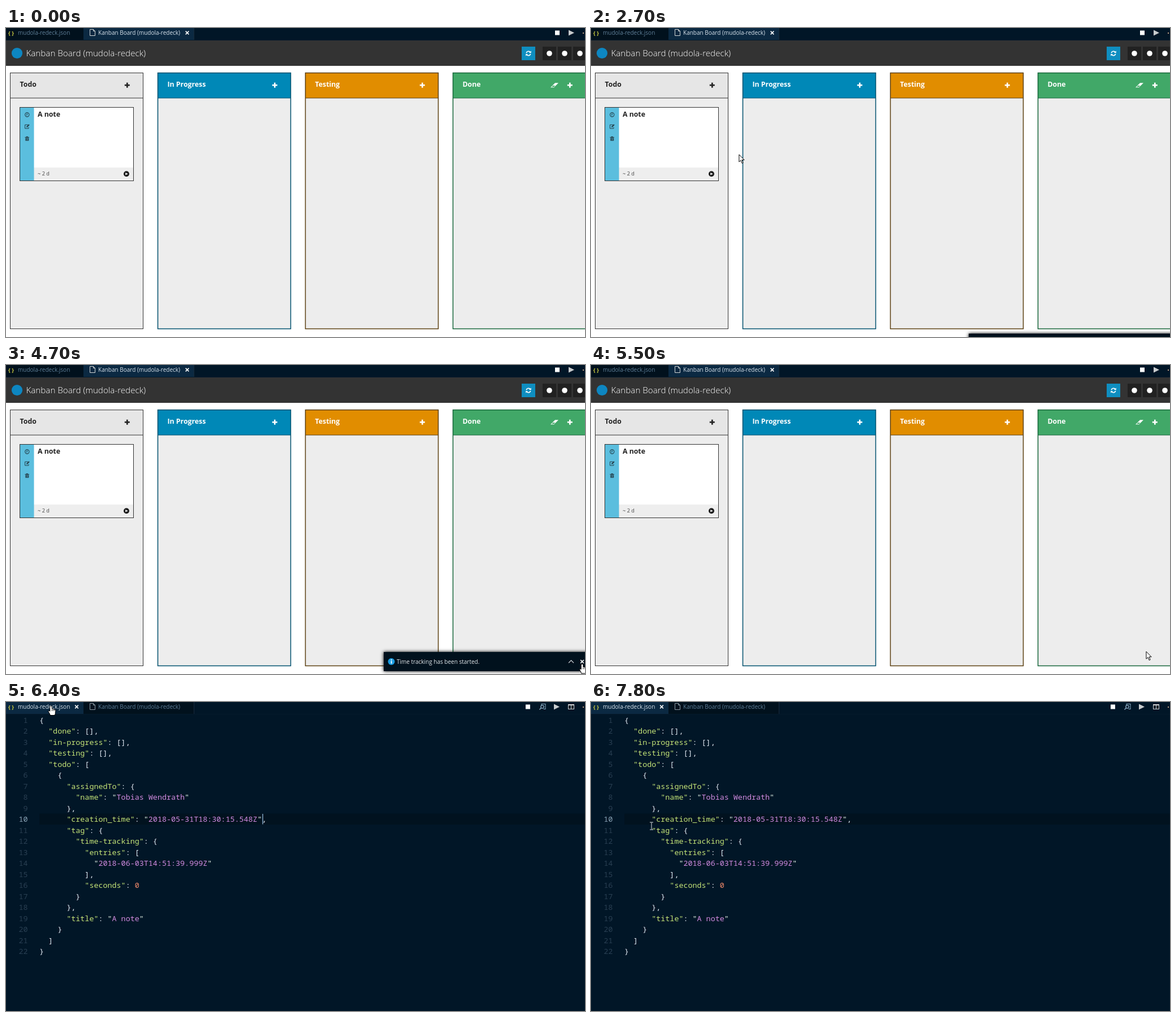
Recreate the animation shown at these times as an HTML page with a canvas. Size 1024 by 547 pixels, loop 8000 ms.

```html
<!DOCTYPE html>
<html lang="en">
<head>
<meta charset="utf-8">
<title>Board</title>
<style>
html, body { margin: 0; width: 100%; height: 100%; overflow: hidden; background: #fff; }
canvas { display: block; width: 100vw; height: 100vh; }
</style>
</head>
<body>
<canvas id="stage" width="1024" height="547"></canvas>
<script>
const ctx = document.getElementById('stage').getContext('2d');
const W = 1024, H = 547, LOOP = 8000, STEP = 100;
const EDITOR_AT = 6400;
const SANS = '"Open Sans", "Noto Sans", sans-serif';
const MONO = '"Noto Sans Mono", "DejaVu Sans Mono", monospace';
const PROJECT = 'mudola-redeck';
const TITLE = `Kanban Board (${PROJECT})`;

const BOARD = {
  done: [], 'in-progress': [], testing: [],
  todo: [{
    assignedTo: { name: 'Tobias Wendrath' },
    creation_time: '2018-05-31T18:30:15.548Z',
    tag: { 'time-tracking': { entries: ['2018-06-03T14:51:39.999Z'], seconds: 0 } },
    title: 'A note'
  }]
};
const LINES = JSON.stringify(BOARD, null, 2).split('\n');

const COLUMNS = [
  { name: 'Todo', fill: '#e6e6e6', edge: '#333', ink: '#222' },
  { name: 'In Progress', fill: '#0088b7', edge: '#00506e', ink: '#fff' },
  { name: 'Testing', fill: '#e18d00', edge: '#5c4012', ink: '#fff' },
  { name: 'Done', fill: '#41a868', edge: '#17663a', ink: '#fff' }
];

const ENTRY = { x: 903, y: 296 };
const MOVES = [
  { from: 300, to: 1100, x: 36.5, y: 152.5 },
  { from: 2400, to: 3280, x: 873, y: 418 },
  { from: 3500, to: 4400, x: 1019, y: 529.5 },
  { from: 5200, to: 5300, x: 1014, y: 525 },
  { from: 5400, to: 6300, x: 79.5, y: 7 },
  { from: 7100, to: 7500, x: 100, y: 235 },
  { from: 7500, to: 7800, x: 107, y: 219.5 }
];

const ramp = (t, a, b) => Math.max(0, Math.min(1, (t - a) / (b - a)));
const ease = (t, a, b) => { const p = ramp(t, a, b); return p * p * (3 - 2 * p); };

function rect(x, y, w, h, color) {
  ctx.fillStyle = color;
  ctx.fillRect(x, y, w, h);
}

function frame(x, y, w, h, color, width = 1) {
  ctx.strokeStyle = color;
  ctx.lineWidth = width;
  ctx.strokeRect(x, y, w, h);
}

function text(str, x, y, size, color, weight = 400, family = SANS) {
  ctx.font = `${weight} ${size}px ${family}`;
  ctx.fillStyle = color;
  ctx.fillText(str, x, y);
}

function disc(x, y, r, color) {
  ctx.fillStyle = color;
  ctx.beginPath();
  ctx.arc(x, y, r, 0, 7);
  ctx.fill();
}

function ring(x, y, r, color, width = 1) {
  ctx.strokeStyle = color;
  ctx.lineWidth = width;
  ctx.beginPath();
  ctx.arc(x, y, r, 0, 7);
  ctx.stroke();
}

function trace(pts, closed) {
  ctx.beginPath();
  pts.forEach(([x, y]) => ctx.lineTo(x, y));
  if (closed) ctx.closePath();
}

function poly(pts, color) {
  trace(pts, true);
  ctx.fillStyle = color;
  ctx.fill();
}

function line(pts, color, width = 1, closed = false) {
  trace(pts, closed);
  ctx.strokeStyle = color;
  ctx.lineWidth = width;
  ctx.stroke();
}

function at(x, y, draw, turn = 0) {
  ctx.save();
  ctx.translate(x, y);
  ctx.rotate(turn);
  draw();
  ctx.restore();
}

function plus(x, y, color, r = 4.5, width = 2.6) {
  rect(x - r, y - width / 2, r * 2, width, color);
  rect(x - width / 2, y - r, width, r * 2, color);
}

const cross = (x, y) => at(x, y, () => plus(0, 0, '#fff', 4, 1.6), Math.PI / 4);

function playIcon(x, y, r, color) {
  poly([[x - r, y - r], [x + r, y], [x - r, y + r]], color);
}

function fileIcon(x, y, color) {
  line([[x, y], [x + 6, y], [x + 9, y + 3], [x + 9, y + 11], [x, y + 11]], color, 1, true);
  line([[x + 6, y], [x + 6, y + 3], [x + 9, y + 3]], color);
}

function previewIcon(x, y) {
  const color = '#8fb0c8';
  frame(x - 1.5, y - 5, 7, 9, color);
  rect(x - 5, y - 2, 7, 7, '#011627');
  ring(x, y, 2.7, color, 1.2);
  line([[x - 2, y + 2], [x - 5, y + 5]], color, 1.5);
}

function splitIcon(x, y, color) {
  frame(x - 5, y - 4, 10, 8, color);
  rect(x - 5, y - 4, 10, 1.5, color);
  rect(x - 0.5, y - 4, 1, 8, color);
}

function tabs(editing, hover) {
  const active = '#0b2942', idle = '#01111d', bright = '#d8e3ec', dim = '#5f7e97';
  const [json, board] = editing ? [active, idle] : [idle, active];
  rect(0, 0, W, 22, '#011627');
  rect(0, 0, 137, 21, json);
  rect(137, 0, 196, 21, board);
  rect(332, 0, 1, 21, '#182a3b');
  rect(0, 21, W, 1, '#061a2b');

  text('{ }', 4, 11.5, 9.5, '#cbcb41', 700);
  text(PROJECT + '.json', 21, 12, 10, editing ? bright : dim);
  fileIcon(148.5, 2.5, editing ? '#8f9aa3' : '#d4d7d6');
  text(TITLE, 163, 12, 10, editing ? dim : bright);
  if (editing || hover) cross(125, 8.5);
  if (!editing) cross(320.5, 8.5);

  const play = editing ? 974 : 1000;
  rect(play - (editing ? 55 : 29), 4.5, 8, 8, '#fff');
  playIcon(play, 8.5, 5, '#c9ccce');
  rect(1020, 8, 2, 2, '#c5a98a');
  if (editing) {
    previewIcon(948.5, 8.5);
    splitIcon(999.5, 8.5, '#d5d5d5');
  }
}

function refreshArc() {
  ctx.strokeStyle = '#fff';
  ctx.lineWidth = 1.7;
  ctx.beginPath();
  ctx.arc(0, 0, 3.7, Math.PI * 1.05, Math.PI * 1.8);
  ctx.stroke();
  poly([[4.8, -4.6], [4.8, -0.9], [1.1, -0.9]], '#fff');
}

function header() {
  rect(0, 22, W, 45, '#333');
  disc(19.5, 44.5, 9.6, '#0d86c1');
  text(TITLE, 35.5, 49.5, 15.2, '#fff', 300);
  rect(912, 33, 24, 24, '#0f8ec0');
  at(924, 45, refreshArc);
  at(924, 45, refreshArc, Math.PI);
  for (let x = 949; x < W; x += 27) {
    rect(x, 33, 24, 24, '#212121');
    disc(x + 12, 45, 4.8, '#fff');
  }
}

function column({ name, fill, edge, ink }, i) {
  const x = 7 + i * 261;
  rect(x, 79, 236, 454, '#ededed');
  rect(x, 79, 236, 45, fill);
  frame(x + 0.5, 79.5, 235, 453, edge, i ? 1.5 : 1);
  rect(x, 123.5, 236, 1, edge);
  text(name, x + 17.5, 104, 12.3, ink, 700);
  plus(x + 207.3, 101.2, ink);
}

function eraser(x, y) {
  const slab = (left, right, top, bottom, color) =>
    poly([[left - top, y + top], [right - top, y + top], [right - bottom, y + bottom], [left - bottom, y + bottom]], color);
  slab(x - 2, x + 4, -4, 4, '#fff');
  slab(x - 1, x + 3, 0.8, 3, '#41a868');
}

function cardIcons(x, ink) {
  ring(x, 153.5, 3.6, ink, 1.1);
  line([[x, 151.3], [x, 154], [x - 1.7, 154]], ink);

  line([[x + 1.7, 171.3], [x - 3.7, 171.3], [x - 3.7, 177.9], [x + 2.7, 177.9], [x + 2.7, 175.5]], ink);
  line([[x - 0.8, 175.5], [x + 3.7, 171]], ink, 1.9);

  rect(x - 3.8, 193, 7.5, 1.1, ink);
  rect(x - 1.6, 191.9, 3, 1.2, ink);
  rect(x - 3, 194.6, 6, 5, ink);
  for (let i = -1; i <= 1; i++) rect(x + i * 1.4 - 0.25, 195.4, 0.5, 3.2, '#5bbede');
}

function card(hover) {
  rect(24, 140, 202, 131, '#fff');
  rect(49, 247, 176, 23, '#eee');
  rect(25, 141, 24.5, 129, '#5bbede');
  frame(24.5, 140.5, 201, 130, hover ? '#1a93bd' : '#333');
  text('A note', 56, 156.8, 12.3, '#222', 700);
  text('~ 2 d', 56, 261.3, 9.2, '#444');
  disc(213, 258.3, 5, '#1c1c1c');
  playIcon(213.5, 258.3, 2.3, '#eee');
  cardIcons(37.3, '#24404b');
}

function shadow(color, blur, offset = 0) {
  ctx.shadowColor = color;
  ctx.shadowBlur = blur;
  ctx.shadowOffsetX = ctx.shadowOffsetY = offset;
}

function tooltip(alpha) {
  ctx.save();
  ctx.globalAlpha = alpha;
  shadow('rgba(0,0,0,.55)', 3, 2.5);
  rect(35.5, 172.5, 57, 16, '#fff');
  shadow('transparent', 0);
  frame(36, 173, 56, 15, '#767676');
  text('Track Time', 40, 184, 9.25, '#575757');
  ctx.restore();
}

function toast(shown, alpha, hover) {
  ctx.save();
  ctx.globalAlpha = alpha;
  ctx.translate(0, (1 - shown) * 39);
  shadow('#000', 6);
  rect(668, 508, 370, 34, '#01111d');
  shadow('transparent', 0);
  disc(681.5, 525, 6, '#1b9de2');
  rect(680.7, 521, 1.8, 1.8, '#fff');
  rect(680.7, 523.8, 1.8, 4.8, '#fff');
  text('Time tracking has been started.', 691, 528.8, 10, '#e4e9ec');
  if (hover) {
    line([[995, 527.3], [999.5, 522.8], [1004, 527.3]], '#d5dade', 1.2);
    cross(1019, 525);
  }
  ctx.restore();
}

const inside = (p, x, y, w, h) => !!p && p.x > x && p.x < x + w && p.y > y && p.y < y + h;

function drawBoard(t, ptr) {
  rect(0, 0, W, H, '#fff');
  tabs(false, inside(ptr, 0, 0, 137, 21));
  header();
  COLUMNS.forEach(column);
  eraser(969, 101.2);
  card(inside(ptr, 24, 140, 202, 131));

  const shown = ease(t, 2600, 3000);
  const alpha = 1 - ramp(t, 5000, 5300);
  if (shown && alpha) toast(shown, alpha, inside(ptr, 668, 508, 356, 39));
}

function drawCode(str, x, y) {
  const put = (part, color) => {
    text(part, x, y, 13.4, color, 500, MONO);
    x += ctx.measureText(part).width;
  };
  const tokens = /("[^"]*")(?=:)|"([^"]*)"|(\d+)|[^"\d]+/g;
  for (const [all, key, value, number] of str.matchAll(tokens)) {
    if (key) put(key, '#c5e478');
    else if (value) {
      put('"', '#e6f5e8');
      put(value, '#d28be0');
      put('"', '#e6f5e8');
    } else put(all, number ? '#f78c6c' : '#e4ebf4');
  }
}

function drawEditor(t) {
  const current = LINES.findIndex(s => s.includes('creation_time'));
  rect(0, 0, W, H, '#011627');
  tabs(true);
  rect(59, 197.5, W - 59, 19.5, '#01121f');
  LINES.forEach((str, i) => {
    const y = 37 + i * 19.48;
    ctx.textAlign = 'right';
    text(i + 1, 38.5, y, 13.4, i === current ? '#8ba3b5' : '#293f52', 400, MONO);
    ctx.textAlign = 'left';
    drawCode(str, 59, y);
  });
  const caretOn = Math.floor((t - EDITOR_AT + 100) / 500) % 2 === 0;
  if (caretOn) rect(453.3, 198, 1.5, 18.5, '#80a4c2');
}

function pointerAt(t) {
  if (t < MOVES[0].from) return null;
  return MOVES.reduce((p, m) => {
    const k = ease(t, m.from, m.to);
    return { x: p.x + (m.x - p.x) * k, y: p.y + (m.y - p.y) * k };
  }, ENTRY);
}

function arrow() {
  const shape = [[0, 0], [0, 13], [3, 10.3], [5.2, 15.4], [7.2, 14.5], [5, 9.5], [9.2, 9.5]];
  poly(shape, '#fff');
  line(shape, '#000', 1, true);
}

function hand() {
  ctx.beginPath();
  for (let i = 0; i < 4; i++) {
    const top = i ? 4.6 + i * 0.6 : 0.3;
    ctx.roundRect(-1.3 + i * 2.1, top, 2.6, 12 - top, 1.2);
  }
  ctx.roundRect(-1.8, 8.5, 9, 7.6, 2);
  ctx.moveTo(-4.4, 9.5);
  ctx.lineTo(-2.8, 9);
  ctx.lineTo(0, 11);
  ctx.lineTo(-1.2, 14.5);
  ctx.closePath();
  ctx.strokeStyle = '#000';
  ctx.lineWidth = 1.8;
  ctx.stroke();
  ctx.fillStyle = '#fff';
  ctx.fill();
  for (let i = 1; i < 4; i++) rect(i * 2.1 - 0.8, 6, 0.7, 3, '#000');
}

function beam() {
  rect(-0.5, -6, 1, 12, '#dfe3e6');
  for (const y of [-7, 6]) rect(-3, y, 6, 1, '#dfe3e6');
}

function pointer(t, p, editing) {
  const onClose = inside(p, 1010, 510, 14, 37) && t < 5300;
  const onLink = p.y < 21 || (!editing && (onClose || inside(p, 25, 146, 24, 54)));
  ctx.lineJoin = 'round';
  at(p.x, p.y, onLink ? hand : editing ? beam : arrow);
  ctx.lineJoin = 'miter';
}

function render(elapsed) {
  const t = Math.floor((elapsed % LOOP) / STEP) * STEP;
  const editing = t >= EDITOR_AT;
  const ptr = pointerAt(t);
  if (editing) drawEditor(t);
  else drawBoard(t, ptr);
  if (ptr) pointer(t, ptr, editing);
  if (t >= 1600 && t < 2500) tooltip(ramp(t, 1500, 1800));
}

const start = performance.now();
function tick(now) {
  render(Math.max(0, now - start));
  requestAnimationFrame(tick);
}
tick(start);
</script>
</body>
</html>
```
